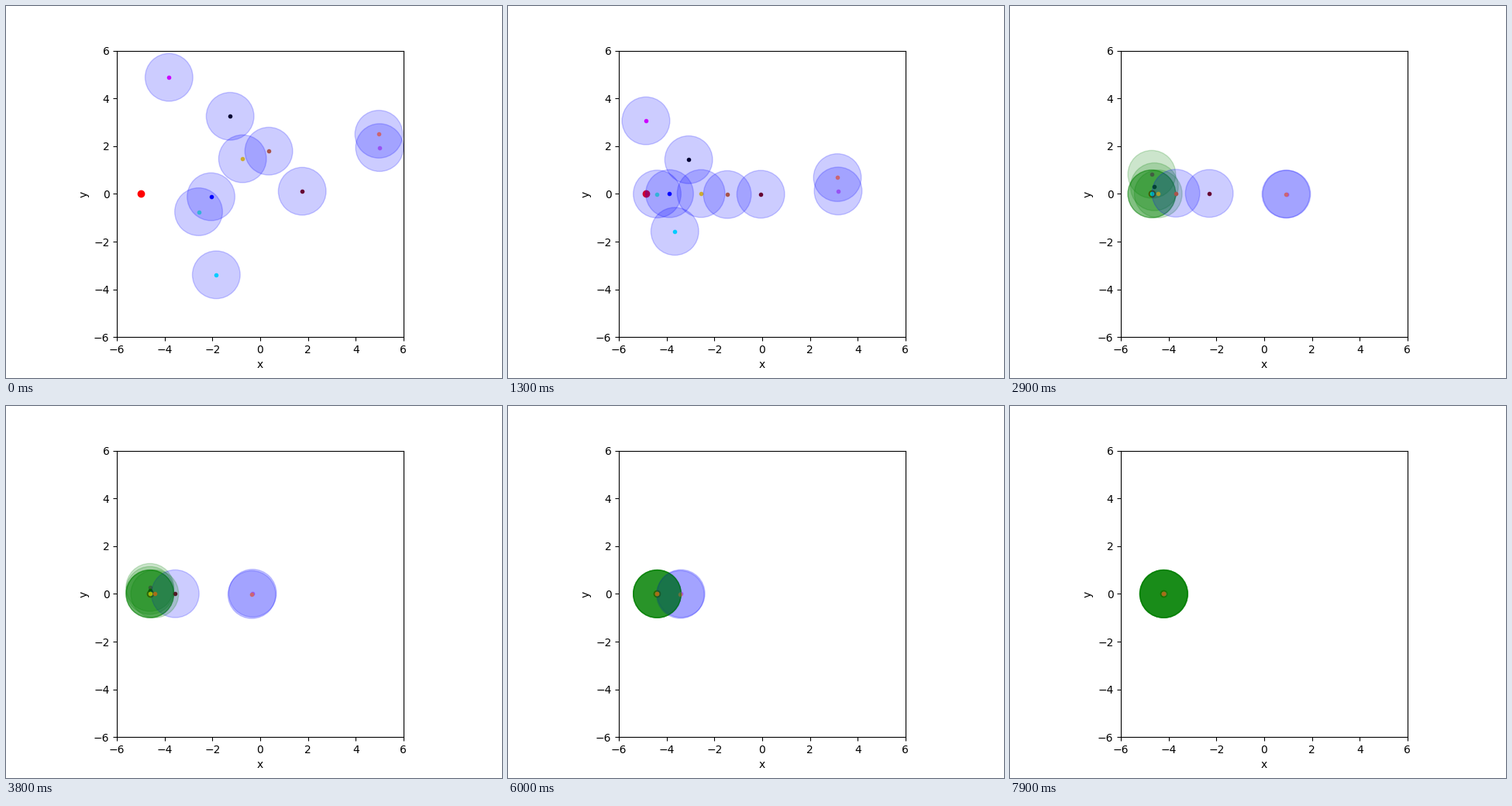
A matplotlib script that plays this animation: 640x480 px, repeating every 8 s.

```python
import numpy as np
import matplotlib.pyplot as plt
from matplotlib.animation import FuncAnimation

FRAMES = 80
STEP = 0.14    # speed per axis while searching
DRIFT = 0.01   # speed of the leader

# colour, start x, start y, step of detection, slow speed along x and y
AGENTS = [
    ("magenta", -3.82, 4.88, 29, 0.061, 0.061),
    ("black", -1.26, 3.25, 20, 0.060, 0.017),
    ("blue", -2.06, -0.12, 24, 0.050, 0.050),
    ("turquoise", -2.58, -0.75, 14, 0.050, 0.050),
    ("cyan", -1.84, -3.39, 22, 0.050, 0.050),
    ("violet", 5.00, 1.94, 62, 0.030, 0.030),
    ("coral", 4.97, 2.50, 62, 0.030, 0.030),
    ("maroon", 1.76, 0.11, 42, 0.050, 0.050),
    ("gold", -0.74, 1.47, 25, 0.050, 0.050),
    ("chocolate", 0.36, 1.79, 32, 0.050, 0.050),
]

rng = np.random.default_rng(4)


def leader_at(k):
    return np.array([-5 + DRIFT * k, 0.0])


def walk(x, y, found, slow):
    """Positions of one agent closing in on the leader axis by axis."""
    pos = np.array([x, y])
    path = [pos]
    for k in range(1, FRAMES):
        step = np.array(slow) if k > found else np.array([STEP, STEP])
        pos = pos + np.clip(leader_at(k) - pos, -step, step)
        wobble = rng.uniform(-0.035, 0.035)
        searching = k < found and pos[1] == 0
        path.append(pos + [0, wobble if searching else 0])
    return path


def dot(color, marker):
    return ax.plot([], [], marker, color=color, zorder=1)[0]


fig, ax = plt.subplots(figsize=(6.4, 4.8), dpi=100)
ax.set(xlim=(-6, 6), ylim=(-6, 6), aspect="equal", xlabel="x", ylabel="y")
ticks = range(-6, 7, 2)
ax.set_xticks(ticks)
ax.set_yticks(ticks)

leader = dot("red", "o")
swarm = []
for color, x, y, found, *slow in AGENTS:
    point = dot(color, ".")
    disc = ax.add_patch(plt.Circle((x, y), 1, color="b", alpha=0.2, zorder=1))
    swarm.append((point, disc, walk(x, y, found, slow), found))


def update(k):
    lx, ly = leader_at(k)
    leader.set_data([lx], [ly])
    for point, disc, path, found in swarm:
        x, y = path[k]
        point.set_data([x], [y])
        disc.center = x, y
        disc.set_color("g" if k >= found else "b")
    return []


anim = FuncAnimation(fig, update, frames=FRAMES, interval=100,
                     init_func=lambda: update(0), repeat=True, repeat_delay=0)
plt.show()
```
